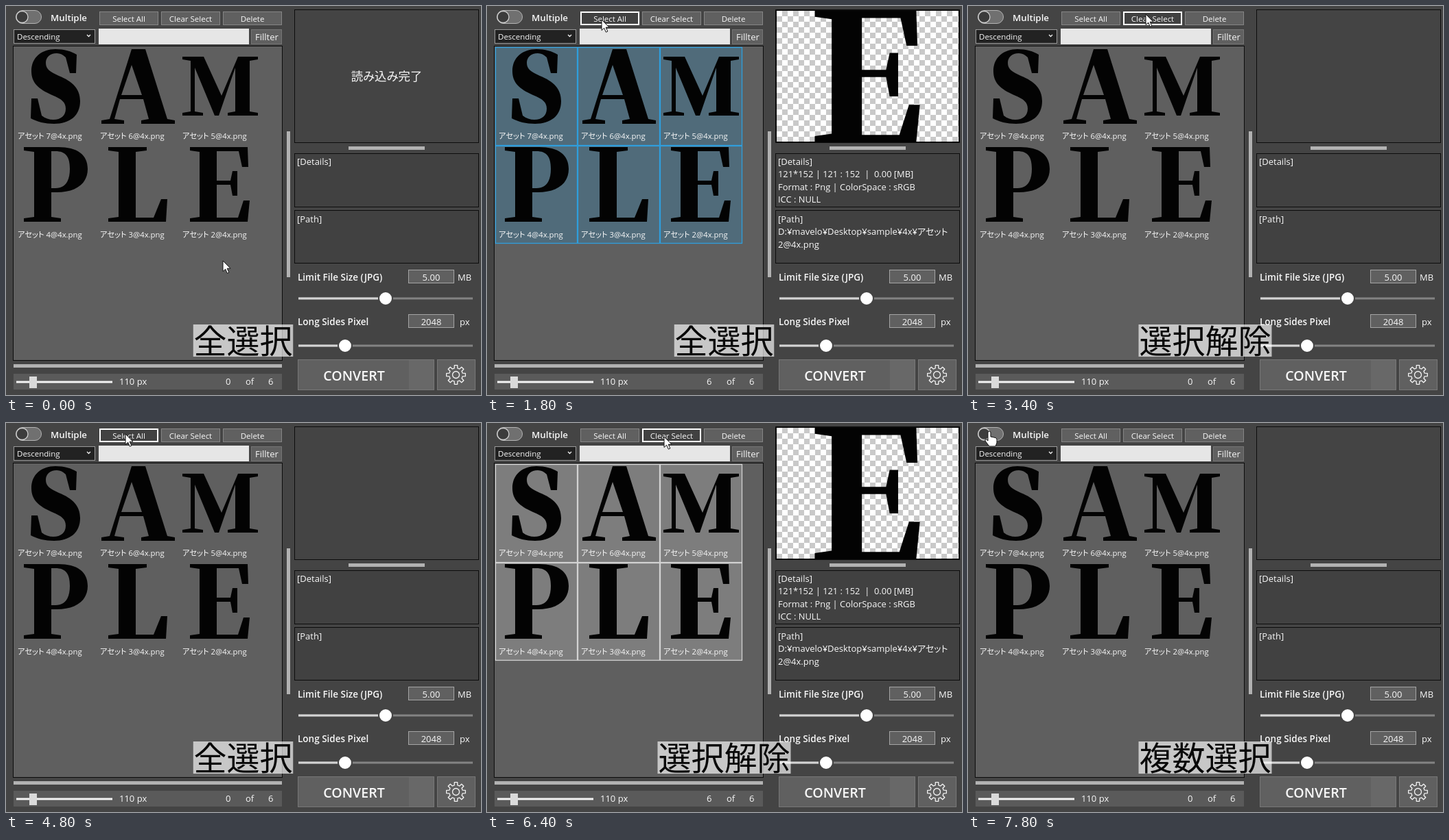
Write an HTML page that moves like this. It is 692 by 568 pixels and loops after 8 s.

```html
<!DOCTYPE html>
<html lang="ja">
<head>
<meta charset="utf-8">
<title>Image converter demo</title>
<style>
  html, body { margin: 0; width: 100%; height: 100%; overflow: hidden; background: #444; }
  svg { display: block; }
  text { font: 500 13px "Open Sans", "Noto Sans CJK JP", sans-serif; fill: #f8f8f8; white-space: pre; font-feature-settings: "palt"; }
  .bold { font-weight: 600; }
  .mid { text-anchor: middle; }
  .caption { font-family: "Noto Sans CJK JP", "Noto Sans CJK", sans-serif; font-weight: 400; fill: #080808; font-feature-settings: normal; }
</style>
</head>
<body>
<svg id="stage" width="692" height="568" viewBox="0 0 692 568">
  <defs>
    <pattern id="checker" x="422" y="7" width="16" height="16" patternUnits="userSpaceOnUse">
      <path fill="#fff" d="M0 0h16v16H0z"/>
      <path fill="#c9c9c9" d="M8 0h8v8H8zM0 8h8v8H0z"/>
    </pattern>
  </defs>
  <g id="back"></g>
  <g id="cells"></g>
  <g id="front"></g>
  <g id="live"></g>
</svg>
<script>
const LOOP = 8000, STEP = 200;
const el = id => document.getElementById(id);

const rect = (x, y, w, h, fill, stroke = 'none', width = 1) =>
  `<rect x="${x}" y="${y}" width="${w}" height="${h}" fill="${fill}" stroke="${stroke}" stroke-width="${width}"/>`;
const text = (x, y, str, size = 13, cls = '') =>
  `<text x="${x}" y="${y}" class="${cls}" style="font-size:${size}px">${str}</text>`;
const shape = (d, x, y, scale = 1, extra = '') =>
  `<path d="${d}" transform="translate(${x} ${y}) scale(${scale})" fill-rule="evenodd" ${extra}/>`;
const button = (b, hover) =>
  rect(b.x + (hover ? 1 : .5), hover ? 9 : 8.5, hover ? 84 : 85, hover ? 18 : 19,
    hover ? '#414141' : '#606060', hover ? '#fff' : '#858585', hover ? 2 : 1) +
  text(b.x + 43, 22.5, b.label, 11.5, 'mid');

// Letter outlines, each drawn from its own top left corner
const LETTERS = [
  { x: 35, y: 63, d: 'M68 8L67 35H58L52 12C48 8 44 6 39 6C29 6 23 12 23 20C23 29 29 33 42 39C62 47 73 58 73 76C73 97 58 109 35 109C22 109 10 106 1 101L2 72H11L17 97C22 101 28 103 34 103C45 103 52 97 52 87C52 78 47 73 32 67C12 58 2 49 2 32C2 12 17 0 37 0C50 0 60 3 68 8Z' },
  { x: 139, y: 63, d: 'M44 0H64L96 102L107 104V109H58V104L69 102L61 73H27L19 102L33 104V109H0V104L12 102ZM44 23L29 67H59Z' },
  { x: 257, y: 74, d: 'M0 0H31L57 57L81 0H110V4L98 6V80L110 82V86H66V82L77 80V16L53 86H47L18 16V80L30 82V86H0V82L12 80V6L0 4Z' },
  { x: 26, y: 206, d: 'M0 0H50C78 0 93 11 93 32C93 54 75 66 48 66H40V102L54 104V109H0V104L15 102V7L0 5ZM40 6V60H46C60 60 67 50 67 32C67 14 61 6 46 6Z' },
  { x: 149, y: 206, d: 'M0 0H56V5L40 7V103H66L77 76H86L84 109H0V104L15 102V7L0 5Z' },
  { x: 268, y: 206, d: 'M0 0H84L85 29H76L71 6H39V49H59L62 35H69V71H62L59 55H39V103H70L78 78H87L84 109H0V104L14 102V7L0 5Z' }
];
const BUTTONS = [
  { x: 136, label: 'Select All' }, { x: 226, label: 'Clear Select' }, { x: 316, label: 'Delete' }
];
const ARROW = 'M0 0V15.5L3.7 12.2L6.3 18.2L8.8 17.1L6.2 11.2H11Z';
const HAND = 'M-2 2a2 2 0 0 1 4 0V8l7 1.5q2 .5 2 3V17l-2 5H0L-6 14q-1-3 2-2l2 2Z';

const gear = () => {
  const points = [];
  for (let i = 0; i < 8; i++)
    for (const [turn, r] of [[-.3, 10], [-.2, 14], [.2, 14], [.3, 10]]) {
      const a = (i + turn) * Math.PI / 4;
      points.push(`${(r * Math.cos(a)).toFixed(1)} ${(r * Math.sin(a)).toFixed(1)}`);
    }
  return `<g transform="translate(655.5 538.5)" fill="none" stroke="#f4f4f4" stroke-width="1.3" stroke-linejoin="round">
    <path d="M${points.join('L')}Z"/><circle r="5"/></g>`;
};

const slider = (label, y, value, unit, unitX, knob, trackY) =>
  text(425, y, label, 13.5, 'bold') +
  rect(586.5, y - 15.5, 66, 19, '#606060', '#a5a5a5') +
  text(619.5, y, value, 13, 'mid') + text(unitX, y, unit) +
  rect(426, trackY - 1.5, 254, 3, '#838383') + rect(426, trackY - 1.5, knob - 426, 3, '#d4d4d4') +
  `<circle cx="${knob}" cy="${trackY}" r="10" fill="#fff" stroke="#444" stroke-width="2"/>`;

el('back').innerHTML =
  rect(0, 0, 692, 568, '#444') +
  `<rect x="14.5" y="6.5" width="37" height="19" rx="9.5" fill="#707070" stroke="#b5b5b5"/>
   <circle cx="23.5" cy="16" r="8.5" fill="#3c3c3c" stroke="#ccc" stroke-width="1.3"/>` +
  text(65, 21.5, 'Multiple', 13.3, 'bold') +
  rect(11.5, 34.5, 118, 20, '#222', '#999') + text(16, 49, 'Descending', 11.5) +
  '<path d="M118 42l2.5 2.5L123 42" fill="none" stroke="#eee" stroke-width="1.4"/>' +
  rect(135, 33, 219, 23, '#e6e6e6') +
  rect(357.5, 34.5, 44, 21, '#606060', '#757575') + text(363, 49.5, 'Fillter') +
  rect(10.5, 58.5, 392, 459, '#5f5f5f', '#0c0c0c') +
  rect(409, 183, 5, 213, '#b2b2b2') + rect(11, 523, 391, 5, '#b2b2b2') +
  rect(11, 537, 391, 23, '#5a5a5a') +
  rect(15, 547.5, 140, 3, '#f4f4f4') + rect(34, 541, 11, 17, '#dadada') +
  text(165, 553, '110 px') + text(349, 553, 'of') + text(382, 553, '6') +
  rect(420.5, 5.5, 268, 194, '#444', '#0c0c0c') + rect(499, 205, 111, 5, '#b2b2b2') +
  rect(420.5, 215.5, 268, 78, '#414141', '#0c0c0c') + text(424, 231.5, '[Details]') +
  rect(420.5, 298.5, 268, 77, '#414141', '#0c0c0c') + text(424, 315.5, '[Path]') +
  slider('Limit File Size (JPG)', 401, '5.00', 'MB', 658, 553, 427) +
  slider('Long Sides Pixel', 466, '2048', 'px', 661, 494, 496) +
  rect(425.5, 516.5, 198, 44, '#606060', '#777') + rect(587, 517, 36, 43, '#686868') +
  text(507, 547, 'CONVERT', 19.6, 'bold mid') +
  rect(628.5, 516.5, 55, 44, '#606060', '#777') + gear();

el('front').innerHTML = LETTERS.map((l, i) =>
  shape(l.d, l.x, l.y, 1, 'fill="#030303"') +
  text(17 + i % 3 * 120, i < 3 ? 193.5 : 337.5, `アセット ${7 - i}@4x.png`, 11.3)).join('');

const cells = ([fill, stroke]) => LETTERS.map((_, i) =>
  rect(12.5 + i % 3 * 120, i < 3 ? 60.5 : 204.5, 119, i < 3 ? 143 : 142, fill, stroke, 1.3)).join('');

const preview =
  rect(421, 6, 267, 193, 'url(#checker)', '#0c0c0c', 2) +
  shape(LETTERS[5].d, 477.5, 7, 1.76, 'fill="#030303"') +
  ['121*152 | 121 : 152  |  0.00 [MB]', 'Format : Png | ColorSpace : sRGB', 'ICC : NULL']
    .map((line, i) => text(424, 250 + i * 18.7, line, 12.9)).join('') +
  text(424, 333.5, 'D:¥mavelo¥Desktop¥sample¥4x¥アセット') + text(424, 352.5, '2@4x.png');

const caption = str => {
  const w = str.length * 48.5;
  return rect(345.5 - w / 2, 465, w, 47, 'rgba(255,255,255,.65)') +
    text(345.5, 507, str, 48, 'caption mid');
};

// Each track lists [start time, value]
const CAPTIONS = [[0, '全選択'], [2400, '選択解除'], [4000, '全選択'], [6000, '選択解除'], [7400, '複数選択']];
const SELECTION = [[0, 'loaded'], [1200, 'active'], [2800, 'faded'], [3000, 'none'],
  [5000, 'active'], [6400, 'faded'], [6600, 'none']];
const COLORS = { active: ['#506b7a', '#2f9edc'], faded: ['#7d7d7d', '#d2d2d2'] };
const POINTER = [[0, 316, 372], [200, 316, 372], [1000, 167, 20], [2200, 167, 20], [2600, 259, 12],
  [3800, 259, 12], [4600, 174, 16], [5000, 174, 16], [5400, 179, 18], [5800, 179, 18],
  [6200, 258, 20], [6800, 258, 20], [7600, 31, 12], [LOOP, 31, 12]];

const valueAt = (track, t) => track.filter(k => k[0] <= t).pop()[1];

function pointerAt(t) {
  const i = POINTER.findIndex(k => k[0] > t);
  const [t0, x0, y0] = POINTER[i - 1], [t1, x1, y1] = POINTER[i];
  const u = (t - t0) / (t1 - t0), ease = u * u * (3 - 2 * u);
  return [x0 + (x1 - x0) * ease, y0 + (y1 - y0) * ease];
}

function draw(t) {
  const [x, y] = pointerAt(t);
  const selection = valueAt(SELECTION, t), colors = COLORS[selection];
  const onBar = y > 7 && y < 29, hand = onBar && x < 53;
  el('cells').innerHTML = colors ? cells(colors) : '';
  el('live').innerHTML =
    BUTTONS.map(b => button(b, onBar && x >= b.x && x <= b.x + 86)).join('') +
    text(320, 553, colors ? '6' : '0') +
    (colors ? preview : '') +
    (selection === 'loaded' ? text(554.5, 109, '読み込み完了', 17.4, 'mid') : '') +
    caption(valueAt(CAPTIONS, t)) +
    shape(hand ? HAND : ARROW, x, y, 1, 'fill="#fff" stroke="#111" stroke-linejoin="round"');
}

let shown = -1;
function tick() {
  const t = Math.floor(performance.now() % LOOP / STEP) * STEP;
  if (t !== shown) draw(shown = t);
  requestAnimationFrame(tick);
}
tick();
</script>
</body>
</html>
```
